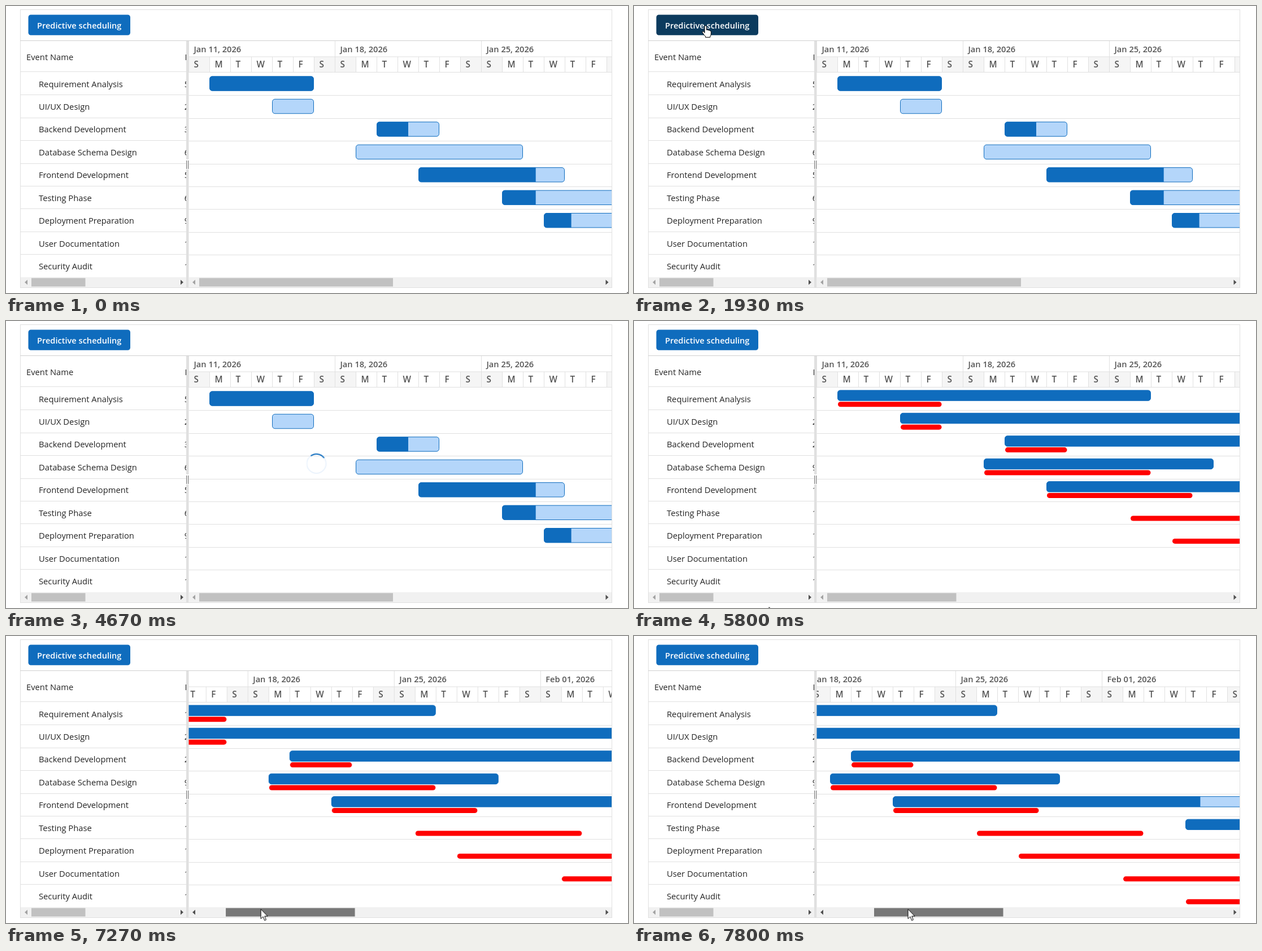
Write an HTML page that moves like this. It is 1101 px wide and 509 px high and loops after 8 s.

```html
<!DOCTYPE html>
<html lang="en">
<head>
<meta charset="utf-8">
<title>Predictive scheduling</title>
<style>
html, body { margin: 0; width: 100%; height: 100%; overflow: hidden; background: #fff; }
svg { display: block; }
text { font: 14.75px "Open Sans", "Noto Sans", sans-serif; fill: #242424; }
.bold { font-weight: 600; font-size: 14.6px; fill: #555; }
.day { font-size: 15.3px; }
.label { font-weight: 600; font-size: 14.6px; fill: #fff; text-anchor: middle; }
.line { stroke: #e0e0e0; fill: none; }
.edge { stroke: #d1d1d1; fill: none; }
.off { fill: #a3a3a3; }
.on { fill: #505050; }

#button, #cursor, #arrow, #hand, #spinner, #arc, .before, .after, .scroll, .thumb, #back {
  animation: 8s linear infinite;
}
#button { animation-name: button; }
#cursor { animation-name: cursor; }
#arrow { animation-name: arrow; animation-timing-function: step-end; }
#hand { animation-name: hand; animation-timing-function: step-end; }
#spinner { animation-name: spinner; animation-timing-function: step-end; }
#arc { animation-name: spin; animation-timing-function: cubic-bezier(.53, .21, .29, .67); }
.before { animation-name: before; animation-timing-function: step-end; }
.after { animation-name: after; animation-timing-function: step-end; }
.scroll { animation-name: scroll; }
.thumb { animation-name: drag, press; animation-timing-function: linear, step-end; }
#back { animation-name: back; animation-timing-function: step-end; }

@keyframes button {
  0%, 15.75% { fill: #0f6cbd; }
  17%, 23.99% { fill: #115ea3; }
  24%, 25.4% { fill: #0c3b5e; }
  26%, 50.2% { fill: #115ea3; }
  51.4%, 100% { fill: #0f6cbd; }
}
@keyframes cursor {
  0% { transform: translate(1099.5px, 507.5px); }
  4.5% { transform: translate(1099.5px, 507.5px); animation-timing-function: cubic-bezier(.65, 0, .35, 1); }
  18.125% { transform: translate(127px, 35px); }
  25.75% { transform: translate(127px, 35px); animation-timing-function: ease-in-out; }
  33.75% { transform: translate(8px, 50px); animation-timing-function: ease-in; }
  37% { transform: translate(20px, 514px); animation-timing-function: step-end; }
  37.01% { transform: translate(239px, 514px); animation-timing-function: step-end; }
  72.375% { transform: translate(239px, 507.5px); animation-timing-function: ease-in-out; }
  80.625%, 83.5% { transform: translate(403px, 484.5px); }
  90.875% { transform: translate(451px, 484.5px); }
  97.5%, 100% { transform: translate(485px, 484.5px); }
}
@keyframes arrow { 0% { opacity: 1; } 15.75% { opacity: 0; } 37.01%, 100% { opacity: 1; } }
@keyframes hand { 0% { opacity: 0; } 15.75% { opacity: 1; } 37.01%, 100% { opacity: 0; } }
@keyframes spinner { 0% { opacity: 0; } 25% { opacity: 1; } 58.75%, 100% { opacity: 0; } }
@keyframes spin {
  0%, 25% { transform: rotate(0deg); }
  41.25% { transform: rotate(360deg); }
  57.5% { transform: rotate(720deg); }
  73.75%, 100% { transform: rotate(1080deg); }
}
@keyframes before { 0% { opacity: 1; } 58.75%, 100% { opacity: 0; } }
@keyframes after { 0% { opacity: 0; } 58.75%, 100% { opacity: 1; } }
@keyframes scroll {
  0%, 83.5% { transform: translateX(0); }
  90.875% { transform: translateX(-154px); }
  97.5%, 100% { transform: translateX(-272px); }
}
@keyframes drag {
  0%, 83.5% { transform: translateX(0); }
  90.875% { transform: translateX(47px); }
  97.5%, 100% { transform: translateX(83px); }
}
@keyframes press { 0% { fill: #c1c1c1; } 78.1% { fill: #a8a8a8; } 82.5%, 100% { fill: #787878; } }
@keyframes back { 0% { fill: #a3a3a3; } 83.6%, 100% { fill: #505050; } }
</style>
</head>
<body>
<svg width="1101" height="509" viewBox="0 0 1101 509">
  <defs>
    <clipPath id="gridClip"><rect x="26" y="62" width="293" height="419"/></clipPath>
    <clipPath id="headClip"><rect x="323.5" y="62" width="749" height="56"/></clipPath>
    <clipPath id="chartClip"><rect x="323.5" y="118" width="749" height="363"/></clipPath>
  </defs>

  <rect id="button" x="39.5" y="15.5" width="180.5" height="36.2" rx="4.5"/>
  <text class="label" x="129.7" y="40">Predictive scheduling</text>

  <g clip-path="url(#gridClip)">
    <text x="36" y="95.5">Event Name</text>
    <text x="316.6" y="95.5">Duration</text>
    <path class="line" d="M26 116.5H319"/>
    <g id="grid"></g>
  </g>

  <g clip-path="url(#headClip)">
    <g id="head" class="scroll"></g>
    <path class="line" d="M323 90H1073M323 117.5H1073"/>
  </g>

  <g clip-path="url(#chartClip)">
    <g id="rows"></g>
    <g class="scroll">
      <g id="before" class="before"></g>
      <g id="after" class="after"></g>
    </g>
  </g>

  <path fill="#f1f1f1" d="M26 481H319V499H26ZM324 481H1072V499H324Z"/>
  <rect x="45" y="482.5" width="95.5" height="15" fill="#c1c1c1"/>
  <rect class="before" x="342" y="482.5" width="343" height="15" fill="#c1c1c1"/>
  <g class="after"><rect class="thumb" x="342" y="482.5" width="228.5" height="15"/></g>
  <path class="off" d="M33 490l5-4.5v9z"/>
  <path class="on" d="M314 490l-5-4.5v9z"/>
  <path id="back" d="M330 490l5-4.5v9z"/>
  <path class="on" d="M1066.5 490l-5-4.5v9z"/>

  <rect x="319" y="62" width="4.5" height="437" fill="#e0e0e0"/>
  <rect x="318.5" y="272" width="5.5" height="18" fill="#fff"/>
  <path d="M319.7 274V289M322.7 274V289" stroke="#616161"/>
  <rect class="line" x="25.5" y="6.5" width="1047" height="493"/>
  <path class="edge" d="M25 61.5H1073"/>

  <g id="spinner" transform="translate(549.5 253)" fill="none" stroke-width="2">
    <circle r="17" stroke="#ebf3fc"/>
    <path id="arc" d="M-12 -12A17 17 0 0 1 12 -12" stroke="#0f6cbd"/>
  </g>

  <g id="cursor" fill="#fff" stroke="#000" stroke-linejoin="round">
    <path id="arrow" d="M0 0V17L4 13.3L6.7 20L9.4 18.8L6.7 12.4H12Z"/>
    <path id="hand" d="M-2 12.5V1.5a1.7 1.7 0 0 1 3.4 0V7.5q1.6-1.2 3 .6q1.8-.9 2.8.8q2.2-.4 2.2 1.8V14q0 3-1.6 5V20.5H-.5V19q-2.8-2.6-5.6-7.4q-.4-1.9 1.5-1.7q1.4.4 2.6 2.6Z"/>
  </g>
</svg>

<script>
const LEFT = 323.5, DAY = 37, ROW = 40.45, BLUE = '#0f6cbd';

// planned and predicted: [first day, length, days done]
const tasks = [
  { name: 'Requirement Analysis', days: [5, 11], plan: [1, 5, 5], next: [1, 15, 15] },
  { name: 'UI/UX Design', days: [2, 21], plan: [4, 2, 0], next: [4, 29, 29] },
  { name: 'Backend Development', days: [3, 20], plan: [9, 3, 1.5], next: [9, 28, 28] },
  { name: 'Database Schema Design', days: [6, 9], plan: [8, 8, 0], next: [8, 11, 11] },
  { name: 'Frontend Development', days: [5, 13], plan: [11, 7, 5.6], next: [11, 19, 14.7] },
  { name: 'Testing Phase', days: [6, 11], plan: [15, 8, 1.6], next: [25, 15, 3] },
  { name: 'Deployment Preparation', days: [9, 14], plan: [17, 13, 1.3] },
  { name: 'User Documentation', days: [10, 15], plan: [22, 14, 0] },
  { name: 'Security Audit', days: [10, 14], plan: [25, 14, 0] }
];

const fill = (id, html) => { document.getElementById(id).innerHTML = html; };
const dayX = d => LEFT + d * DAY;
const text = (x, y, s, cls = '') => `<text class="${cls}" x="${x}" y="${y}">${s}</text>`;
const line = d => `<path class="line" d="${d}"/>`;
const rect = (x, y, w, h, color, more = '') =>
  `<rect x="${x}" y="${y}" width="${w}" height="${h}" fill="${color}" ${more}/>`;

function bar([start, len, done], y, h) {
  const x = dayX(start), w = len * DAY - 1, p = done * DAY;
  const color = done < len ? '#b4d6fa' : BLUE;
  let out = rect(x, y, w, h, color, `rx="4.5" stroke="${BLUE}"`);
  if (done && done < len) {
    out += `<path fill="${BLUE}" d="M${x + p} ${y}V${y + h}H${x + 4.5}q-4.5 0 -4.5 -4.5V${y + 4.5}q0 -4.5 4.5 -4.5Z"/>`;
  }
  return out;
}

let grid = '', rows = '', before = '', after = '', head = '';

tasks.forEach(({ name, days, plan, next }, i) => {
  const y = i * ROW;
  const low = Math.floor(117.2 + ROW * (i + 1)) + .5;
  grid += text(58, 143.5 + y, name) + line(`M26 ${low}H319`);
  grid += text(315.8, 143.5 + y, days[0], 'before') + text(315.8, 143.5 + y, days[1], 'after');
  rows += line(`M323 ${low + 1}H1073`);
  before += bar(plan, 124.8 + y, 25.5);
  if (next) after += bar(next, 122.9 + y, 18.4);
  after += rect(dayX(plan[0]) + .5, 143.2 + y, plan[1] * DAY - 1.5, 9, '#f00', 'rx="4.5"');
});

['Jan 11', 'Jan 18', 'Jan 25', 'Feb 01', 'Feb 08'].forEach((date, w) => {
  const x = dayX(w * 7);
  head += line(`M${x} 62V90`) + text(x + 9, 82, date + ', 2026', 'bold');
  [...'SMTWTFS'].forEach((letter, d) => {
    const left = x + d * DAY;
    if (d % 6 === 0) head += rect(left, 90, DAY, 27, '#f5f5f5');
    head += line(`M${left} 90V117`) + text(left + 9, 109.3, letter, 'bold day');
  });
});

fill('grid', grid);
fill('rows', rows);
fill('before', before);
fill('after', after);
fill('head', head);
</script>
</body>
</html>
```
